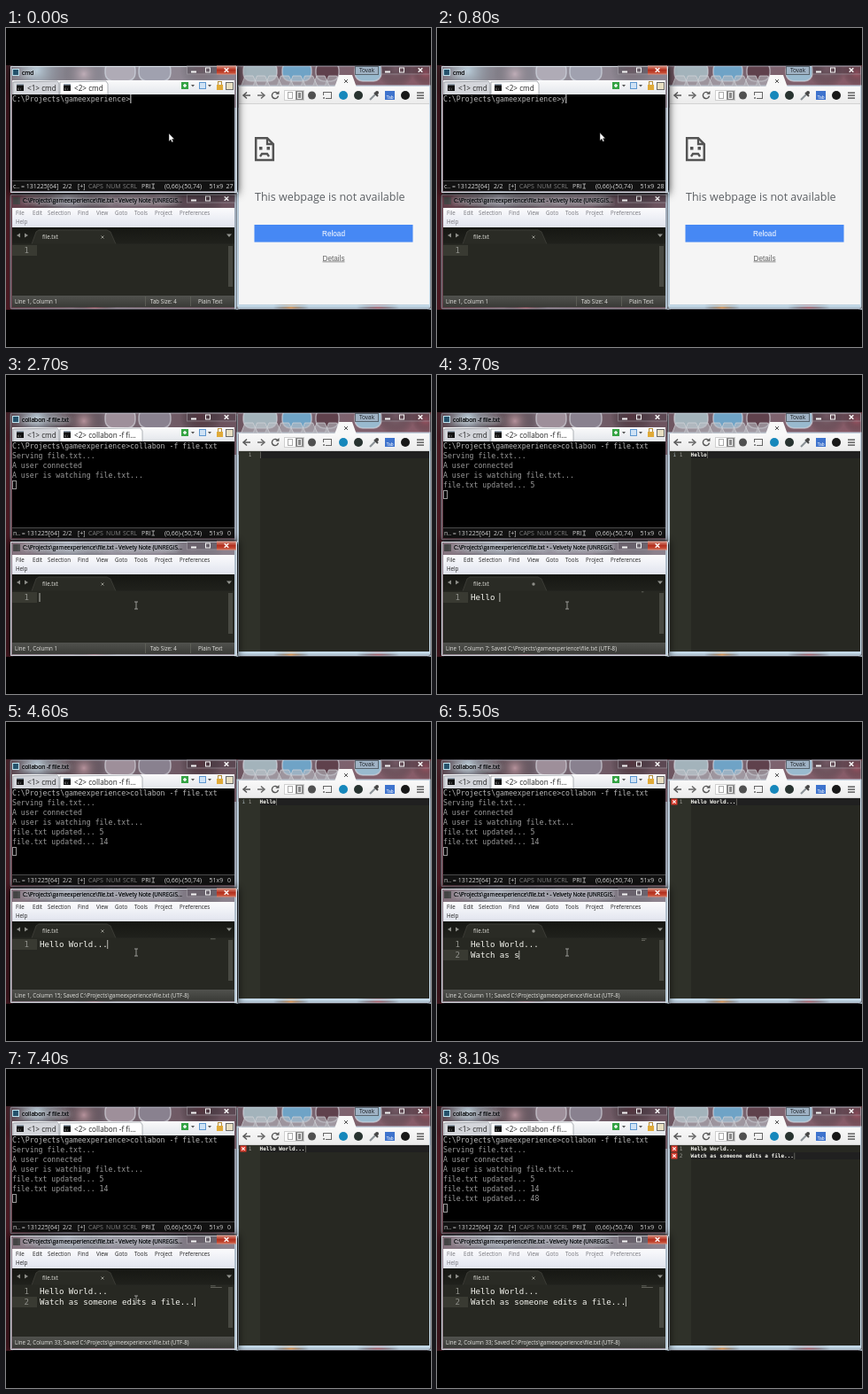
Write an HTML page with a canvas that moves like this. It is 480 px wide and 360 px high and loops after 8.2 s.

```html
<!DOCTYPE html>
<html lang="en">
<head>
<meta charset="utf-8">
<title>Shared file editing</title>
<style>
html, body { margin: 0; height: 100%; overflow: hidden; background: #000; }
canvas { display: block; width: 100vw; height: 100vh; }
</style>
</head>
<body>
<canvas id="stage" width="480" height="360"></canvas>
<script>
const c = document.getElementById('stage').getContext('2d');
const LOOP = 8200, STEP = 100;
const UI = '"Open Sans", sans-serif', ARIAL = '"Liberation Sans", sans-serif', MONO = '"DejaVu Sans Mono", monospace';
const PATH = 'C:\\Projects\\gameexperience';
const COMMAND = 'collabon -f file.txt';

// Key moments, in ms
const RUN = 1200, CLICK = 1600, LOADED = 1700, EDIT = 2600;
const SAVES = [3300, 4500, 7400];
// Typed pieces: start, ms per character, text
const KEYS = [
  [2800, 100, 'Hello'], [3650, 100, ' '], [3800, 75, 'World...'],
  [4700, 100, '\n'], [4825, 75, 'Watch as someone edits a file...']
];
const MOUSE = [[0, 184, 123], [1200, 184, 122], [1550, 395, 235], [2050, 395, 235], [2550, 147, 260], [LOOP, 147, 260]];

function rect(x, y, w, h, fill) { c.fillStyle = fill; c.fillRect(x, y, w, h); }
function frame(x, y, w, h, color, width = 1) {
  c.strokeStyle = color; c.lineWidth = width;
  c.strokeRect(x + .5, y + .5, w - 1, h - 1);
}
function poly(points, fill) {
  c.beginPath();
  points.forEach(([x, y]) => c.lineTo(x, y));
  c.closePath();
  c.fillStyle = fill; c.fill();
}
function line(points, color, width = 1) {
  c.beginPath();
  points.forEach(([x, y], i) => i ? c.lineTo(x, y) : c.moveTo(x, y));
  c.strokeStyle = color; c.lineWidth = width; c.stroke();
}
function dot(x, y, r, fill) { c.beginPath(); c.arc(x, y, r, 0, 7); c.fillStyle = fill; c.fill(); }
function text(s, x, y, size, color, font = UI, align = 'left', weight = '') {
  c.font = `${weight} ${size}px ${font}`; c.textAlign = align; c.fillStyle = color;
  c.fillText(s, x, y);
}
function gradient(x0, y0, x1, y1, ...colors) {
  const g = c.createLinearGradient(x0, y0, x1, y1);
  colors.forEach((color, i) => g.addColorStop(i / (colors.length - 1), color));
  return g;
}
function cross(x, y, r, color, width = 1) {
  line([[x - r, y - r], [x + r, y + r]], color, width);
  line([[x + r, y - r], [x - r, y + r]], color, width);
}
function blob(x, y, r, color) {
  const g = c.createRadialGradient(x, y, 0, x, y, r);
  g.addColorStop(0, color); g.addColorStop(1, 'transparent');
  rect(x - r, y - r, 2 * r, 2 * r, g);
}
const typed = (t, start, step, s) => t < start ? '' : s.slice(0, Math.floor((t - start) / step) + 1);
const documentAt = t => KEYS.map(([start, step, s]) => typed(t, start, step, s)).join('');
const lastSave = t => SAVES.filter(s => s <= t).pop();
const savedAt = t => lastSave(t) ? documentAt(lastSave(t)) : '';

// Translucent window frame; the focused one casts a shadow around itself
function glass(x, y, w, h, active) {
  c.save();
  if (active) {
    c.save();
    c.beginPath(); c.rect(0, 42, 480, 276); c.rect(x, y, w, h); c.clip('evenodd');
    c.shadowColor = 'rgba(0,0,0,.8)'; c.shadowBlur = 9;
    rect(x, y, w, h, '#000');
    c.restore();
  }
  c.beginPath(); c.roundRect(x + .5, y + .5, w - 1, h - 1, 3);
  c.fillStyle = active ? 'rgba(205,222,235,.45)' : 'rgba(190,200,212,.2)'; c.fill();
  c.strokeStyle = active ? '#17171b' : '#45434a'; c.lineWidth = 1; c.stroke();
  frame(x + 1, y + 1, w - 2, h - 2, active ? 'rgba(240,250,255,.75)' : 'rgba(225,235,245,.3)');
  c.restore();
}
function caption(s, x, y, size, maxWidth) {
  c.save();
  c.beginPath(); c.rect(x - 6, y - 10, maxWidth + 6, 14); c.clip();
  c.shadowColor = '#e4edf2'; c.shadowBlur = 7;
  for (let i = 0; i < 3; i++) text(s, x, y, size, '#15171a');
  c.restore();
}
function windowButtons(x, y, active) {
  rect(x, y - 5, 34, 10, 'rgba(55,45,55,.3)');
  rect(x + 34, y - 5, 22, 10, active ? gradient(0, y - 5, 0, y + 5, '#dc9482', '#b3301f', '#cf5b40') : 'rgba(55,45,55,.3)');
  frame(x, y - 5, 56, 10, 'rgba(230,230,235,.35)');
  rect(x + 5, y + 1, 6, 2, '#f4f4f4');
  frame(x + 21, y - 3, 6, 6, '#f4f4f4');
  cross(x + 45, y, 2.3, '#fff', 1.4);
}

function drawDesktop() {
  rect(0, 0, 480, 360, '#000');
  c.save();
  c.beginPath(); c.rect(0, 42, 480, 276); c.clip();
  rect(0, 42, 480, 276, gradient(0, 0, 480, 0, '#481821', '#65505a', '#56343e', '#6a4c57', '#7c3e4a'));
  rect(258, 90, 222, 228, gradient(0, 90, 0, 318, '#8a8c98', '#a9bccb'));
  [[35, 48, 45, '#a9bcc8'], [88, 52, 24, '#b5858d'], [220, 46, 24, '#4d1720'], [440, 46, 22, '#835662'],
   [474, 50, 16, '#a63a4a'], [70, 192, 50, '#77717c'], [210, 194, 36, '#4b2b35'], [100, 318, 25, '#8d3c49'],
   [322, 316, 20, '#d98332'], [420, 316, 24, '#a14b55']].forEach(b => blob(...b));
  [[112, 34, '#96808a'], [150, 36, '#7c6f7d'], [268, 38, '#9cadb4'], [312, 33, '#5b9ac2'],
   [350, 26, '#471f29'], [394, 30, '#8fb6cd']].forEach(([x, w, fill]) => {
    c.beginPath(); c.roundRect(x, 38, w, 22, 9);
    c.fillStyle = fill; c.fill();
    c.strokeStyle = 'rgba(225,225,230,.6)'; c.lineWidth = 1.5; c.stroke();
  });
  c.restore();
}

function drawTerminal(t) {
  const active = t < CLICK, running = t >= RUN;
  const input = running ? COMMAND : t >= 900 ? typed(t, 900, 12.5, COMMAND) : t >= 700 ? 'y' : '';
  glass(4, 42, 258, 145, active);
  rect(7, 46, 8, 8, '#24526b'); frame(7, 46, 8, 8, '#bfe3ee');
  caption(running ? COMMAND : 'cmd', 18, 52.5, 6.6, 180);
  windowButtons(204, 47.5, active);

  rect(7, 59, 251, 16, gradient(0, 59, 0, 75, '#fafafb', '#e3e6eb'));
  const tab = (x, w, label, front) => {
    poly([[x, 75], [x, 61], [x + 2, 60], [x + w - 3, 60], [x + w, 63], [x + w, 75]], front ? '#fff' : '#d4d6db');
    line([[x, 75], [x, 61], [x + w - 2, 60], [x + w, 63], [x + w, 75]], '#8f929a', .7);
    rect(x + 4, 64, 8, 7, '#111'); rect(x + 4, 63, 8, 1.5, '#9caab8');
    text('c:', x + 5, 69.5, 4, '#ddd', MONO);
    text(label, x + 16, 70.5, 8.2, '#222');
  };
  tab(8, 52, '<1> cmd', false);
  tab(61, running ? 93 : 54, running ? '<2> collabon -f fi...' : '<2> cmd', true);
  rect(198, 61, 8, 8, '#35a344');
  line([[202, 63], [202, 67]], '#fff', 1.4); line([[200, 65], [204, 65]], '#fff', 1.4);
  rect(218, 61, 8, 8, '#cfe2f5'); frame(218, 61, 8, 8, '#5f98d0');
  [211, 230].forEach(x => poly([[x - 2, 64], [x + 2, 64], [x, 66.5]], '#555'));
  frame(239, 60, 5, 6, '#b28c3c'); rect(238, 64, 7, 6, '#e0aa38');
  rect(248, 61, 9, 9, '#e8dfc2'); frame(248, 61, 9, 9, '#6a6a6a');

  rect(7, 75, 251, 98, '#000');
  const lines = [PATH + '>' + input];
  if (running) lines.push('Serving file.txt...');
  if (t >= 1900) lines.push('A user connected');
  if (t >= 2100) lines.push('A user is watching file.txt...');
  SAVES.forEach(s => {
    if (t >= s + 100) lines.push('file.txt updated... ' + documentAt(s).replace('\n', '\r\n').trimEnd().length);
  });
  lines.forEach((s, i) => text(s, 7, 83 + 11 * i, 8.2, i ? '#9a9a9a' : '#b8b8b8', MONO));
  if (running) frame(7, 75 + 11 * lines.length, 5, 10, '#999');
  else rect(7 + 4.94 * lines[0].length, 75, 1, 10, '#ddd');

  rect(7, 172, 251, 12, '#121212'); rect(7, 172, 251, 1, '#4a4a4a');
  const status = (s, x, color = '#d6d6d6') => text(s, x, 181, 7, color);
  status((running ? 'n' : 'c') + '.. = 131225[64]', 8);
  status('2/2', 64); status('[+]', 81);
  status('CAPS', 93, '#808080'); status('NUM', 113, '#808080'); status('SCRL', 132, '#808080');
  status('PRI', 153);
  line([[164.5, 176], [168, 176]], '#d6d6d6', .7);
  line([[166.2, 176], [166.2, 181]], '#d6d6d6', .7);
  line([[164.5, 181], [168, 181]], '#d6d6d6', .7);
  status('(0,66)-(50,74)', 179); status('51x9', 229.5);
  status(running ? '0' : 27 + input.length, running ? 250 : 248.5);
}

function drawEditor(t) {
  const active = t >= EDIT, doc = documentAt(t), rows = doc.split('\n');
  const dirty = doc !== savedAt(t), saved = t - lastSave(t) < 1400;
  glass(4, 187, 258, 131, active);
  rect(8, 191, 8, 8, '#444');
  caption(`${PATH}\\file.txt ${dirty ? '• ' : ''}- Velvety Note (UNREGIS...`, 19, 197, 6.3, 182);
  windowButtons(204, 192.5, active);

  rect(7, 203, 251, 22, gradient(0, 203, 0, 225, '#fbfbfd', '#e1e4ee'));
  const ink = active && t < 7900 ? '#222' : '#77777d';
  [['File', 11], ['Edit', 30], ['Selection', 47], ['Find', 81], ['View', 102], ['Goto', 123], ['Tools', 145],
   ['Project', 168], ['Preferences', 196]].forEach(([s, x]) => text(s, x, 211, 6.2, ink));
  text('Help', 11, 221, 6.2, ink);

  rect(7, 225, 251, 19, gradient(0, 225, 0, 244, '#161713', '#20211c'));
  const tab = [[29, 244], [34, 230], [37, 228], [114, 228], [118, 230], [124, 244]];
  poly(tab, '#2a2b25'); line(tab, '#45463f', .7);
  rect(7, 243.5, 251, 59, '#272822');
  poly([[16, 231.5], [16, 236.5], [12, 234]], '#8d8e89');
  poly([[21, 231.5], [21, 236.5], [25, 234]], '#8d8e89');
  poly([[249, 232.5], [255, 232.5], [252, 236]], '#92938e');
  text('file.txt', 41, 238, 6.2, '#e2e2dc');
  if (dirty) dot(109, 236, 1.7, '#8e8e88'); else cross(109, 236, 1.5, '#999a92', .9);

  rect(7, 245 + 12 * (rows.length - 1), 28, 12, '#393a32');
  rows.forEach((s, i) => {
    text(i + 1, 26, 254 + 12 * i, 9.1, '#8f908a', MONO, 'right');
    text(s, 38, 254 + 12 * i, 9.1, '#f8f8f2', MONO);
    if (active) rect(231, 244.5 + 1.5 * i, s.length * .4, .7, '#777870');
  });
  const row = rows.length, column = rows[row - 1].length + 1;
  if (active) rect(37.5 + 5.48 * (column - 1), 246 + 12 * (row - 1), 1, 10, '#b8b8b2');
  rect(251, 246, 5, 46, '#484942');

  rect(7, 302, 251, 13, gradient(0, 302, 0, 315, '#51524e', '#393a36'));
  const place = `Line ${row}, Column ${column}`;
  text(place + (saved ? `; Saved ${PATH}\\file.txt (UTF-8)` : ''), 10, 310.5, 6.2, '#e4e4e0');
  if (!saved) {
    text('Tab Size: 4', 163, 310.5, 6.2, '#e4e4e0');
    text('Plain Text', 217, 310.5, 6.2, '#e4e4e0');
    [157, 208].forEach(x => rect(x, 303, .7, 11, '#66675f'));
  }
}

function drawToolbar() {
  rect(263, 66, 215, 20, gradient(0, 66, 0, 86, '#f9f9f9', '#ebebeb'));
  rect(263, 85.5, 215, .5, '#b8b8b8');
  const arrow = (x, dir, color) => {
    line([[x - 4 * dir, 76], [x + 4 * dir, 76]], color, 1.5);
    line([[x, 72.5], [x + 4 * dir, 76], [x, 79.5]], color, 1.5);
  };
  arrow(272, -1, '#555'); arrow(288, 1, '#666');
  c.beginPath(); c.arc(304, 76, 3.6, .2, 5.5); c.strokeStyle = '#555'; c.lineWidth = 1.4; c.stroke();
  poly([[304.5, 74.8], [308.5, 74.8], [308.5, 71]], '#555');
  rect(314, 70, 23, 12, '#fff'); frame(314, 70, 23, 12, '#cfcfcf');
  frame(318, 72, 6, 8, '#aaa');
  rect(327, 71, 9, 10, '#8a8a8a'); frame(329, 72, 5, 8, '#eee');
  dot(345.5, 76, 4.5, '#505050');
  frame(358, 72, 10, 8, '#666'); rect(357, 76, 4, 5, '#f2f2f2'); dot(359, 79, 1, '#666');
  dot(381, 76, 5, '#1687bb');
  dot(398, 76, 5, '#283330');
  line([[411, 81], [417, 75]], '#8b9297', 2.2); line([[416, 73], [420, 77]], '#444', 2); dot(419, 73, 2, '#444');
  rect(428, 71, 11, 10, '#3e73cd'); text('Tab', 433.5, 79.5, 5, '#fff', ARIAL, 'center');
  dot(451, 76, 5, '#181818');
  [73, 76, 79].forEach(y => rect(464, y - .6, 8, 1.4, '#555'));
}

function drawErrorPage() {
  rect(263, 86, 215, 226, '#f5f5f5');
  c.save();
  c.translate(281, 123);
  line([[1.2, 1.2], [14, 1.2], [20.8, 8], [20.8, 26], [1.2, 26], [1.2, 1.2], [3, 1.2]], '#545454', 2.5);
  line([[14, 1], [14, 8], [21, 8]], '#545454', 2.3);
  rect(5, 11, 3.5, 3.5, '#545454'); rect(13.5, 11, 3.5, 3.5, '#545454');
  line([[6, 22], [8, 19], [14, 19], [16, 22]], '#545454', 2.3);
  c.restore();
  text('This webpage is not available', 281, 194.7, 12.5, '#5c6064');
  rect(280.5, 222, 179, 19.6, '#4688f4');
  text('Reload', 370, 235, 8.2, '#fff', ARIAL, 'center');
  text('Details', 370, 262.5, 8.2, '#666', ARIAL, 'center');
  rect(357.5, 263.5, 25, .8, '#777');
}

function drawSharedPage(t) {
  const rows = savedAt(t - 200).split('\n'), last = rows.length - 1;
  rect(263, 86, 215, 226, '#272822');
  rect(263, 86, 24, 226, '#2f3129');
  rect(287, 86 + 8 * last, 191, 8, '#202020');
  rows.forEach((s, i) => {
    const y = 90 + 8 * i;
    if (t >= SAVES[1] + 200) {
      rect(264.5, y - 3.5, 7, 7, '#d83a2c'); cross(268, y, 1.7, '#fff', 1.1);
    } else if (s) text('i', 266.5, y + 2, 6, '#aebbc1', MONO);
    text(i + 1, 277.5, y + 2.2, 6.05, '#9a9b94', MONO, 'right');
    text(s, 286.5, y + 2.2, 6.05, '#f8f8f2', MONO, 'left', 'bold');
  });
  rect(287 + 3.64 * rows[last].length, 86.5 + 8 * last, .7, 7.5, '#777870');
}

function drawBrowser(t) {
  const active = t >= CLICK && t < EDIT;
  glass(260, 42, 220, 276, active);
  frame(261, 65, 218, 249, 'rgba(205,228,243,.85)', 2);
  for (let i = 7; i >= 0; i--) {
    const x = 265 + i * 13.5;
    const shape = [[x, 67], [x + 5, 54], [x + 14, 54], [x + 20, 67]];
    poly(shape, 'rgba(185,187,194,.6)'); line(shape, '#d5d6da', .7);
  }
  poly([[371, 67], [376, 53], [391, 53], [396, 67]], '#f8f8f8');
  cross(384, 60, 2, '#555', 1);
  rect(394, 43, 27, 10, '#9fb2c4'); frame(394, 43, 27, 10, '#59656f');
  text('Tovak', 407.5, 50, 6.5, '#1c2126', UI, 'center');
  windowButtons(423, 47.5, active);
  drawToolbar();
  if (t < LOADED) drawErrorPage(); else drawSharedPage(t);
  if (t >= CLICK && t < 2000) {
    rect(263, 300, 70, 12, '#e7e7e7'); frame(263, 300, 70, 12, '#b8b8b8');
    text('Waiting for localhost...', 265, 308, 6, '#777');
  }
}

function drawMouse(t) {
  if (t >= 7700) return;
  const i = MOUSE.findIndex(p => p[0] > t), [t0, x0, y0] = MOUSE[i - 1], [t1, x1, y1] = MOUSE[i];
  const u = (t - t0) / (t1 - t0), e = u * u * (3 - 2 * u);
  const x = x0 + (x1 - x0) * e, y = y0 + (y1 - y0) * e;
  c.save();
  c.translate(x, y);
  if (x < 257 && y > 243) {
    [[[-2, -4], [2, -4]], [[0, -4], [0, 4]], [[-2, 4], [2, 4]]].forEach(stroke => line(stroke, '#a5a5a2', .9));
  } else if (t >= 1550 && t <= 2050) {
    const hand = [[-2, -6], [0, -6], [0, -2], [4, -1], [4, 3], [2, 6], [-2, 6], [-5, 1], [-4, 0], [-2, 2]];
    poly(hand, '#fff'); line([...hand, hand[0]], '#222', .6);
  } else {
    const arrow = [[0, -4], [0, 5], [2, 3], [3.4, 6], [5, 5.3], [3.6, 2.5], [6, 2.3]];
    poly(arrow, '#fff'); line([...arrow, arrow[0]], '#222', .5);
  }
  c.restore();
}

function draw(now) {
  const t = Math.floor(now % LOOP / STEP) * STEP;
  const focused = t < CLICK ? drawTerminal : t < EDIT ? drawBrowser : drawEditor;
  drawDesktop();
  [drawTerminal, drawEditor, drawBrowser].filter(w => w !== focused).forEach(w => w(t));
  focused(t);
  drawMouse(t);
  requestAnimationFrame(draw);
}
requestAnimationFrame(draw);
</script>
</body>
</html>
```
